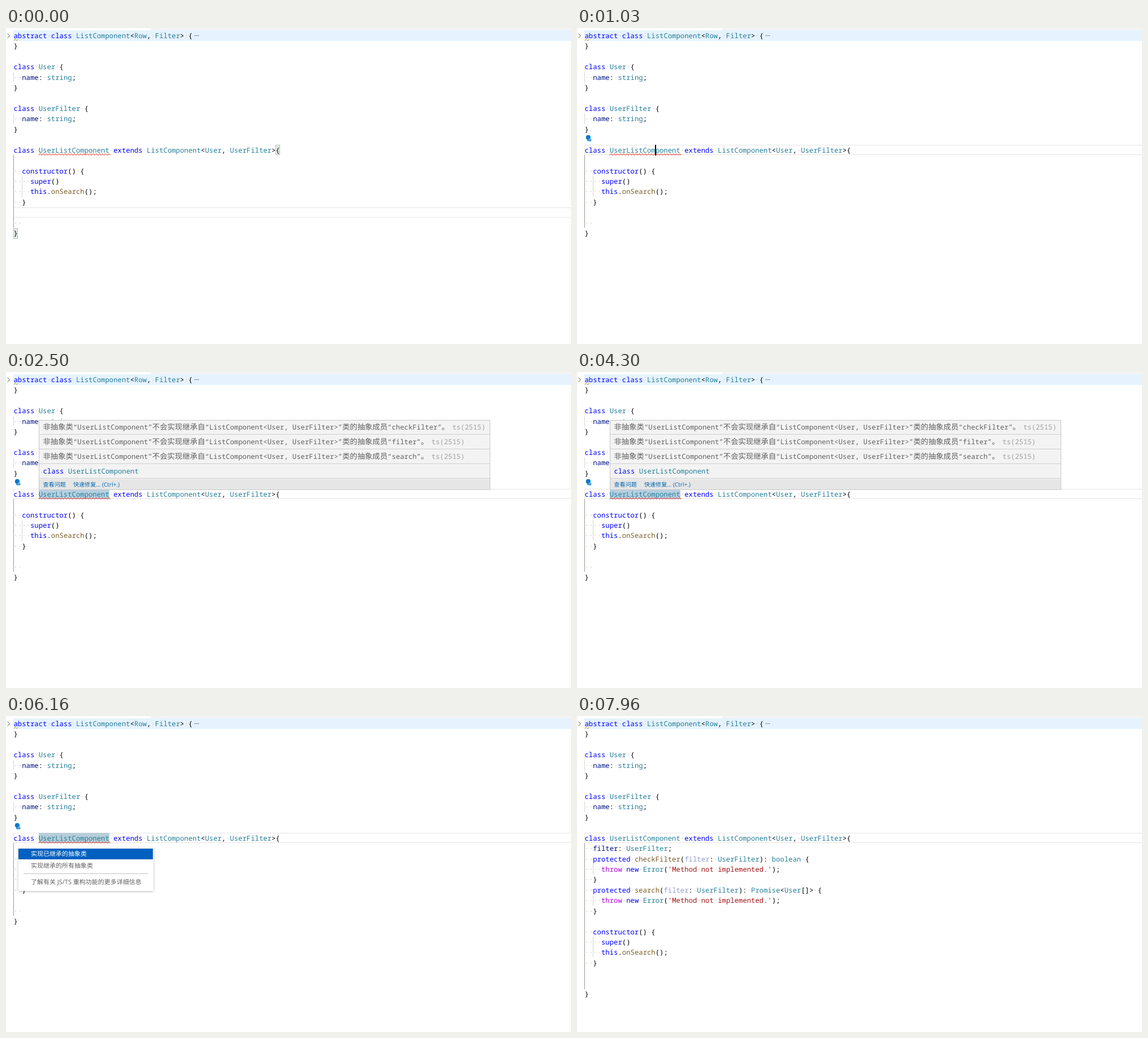
These frames come from a looping animation (1000 px wide and 560 px high, 8000 ms). An HTML page:

```html
<!DOCTYPE html>
<html lang="zh-CN">
<head>
<meta charset="utf-8">
<style>
html, body { margin: 0; width: 100%; height: 100%; overflow: hidden; background: #fff; }
#stage { position: relative; width: 1000px; height: 560px; overflow: hidden; text-rendering: geometricPrecision; }
#stage div, pre, svg { position: absolute; margin: 0; box-sizing: border-box; }
pre, #hover { font: 12.277px/18.44px "Noto Sans Mono", "Noto Sans CJK SC", monospace; white-space: pre; }
pre { left: 13.5px; color: #000; }
svg { left: 0; top: 0; }
.str { color: #a31515; } .flow { color: #af00db; } .key { color: #00f; } .type { color: #267f99; }
.fn { color: #795e26; } .param, .prop { color: #001080; } .dot { color: #c6c4b8; }
.faded .param { opacity: .42; }
.guide { width: 1px; background: #d6d6d6; }
.active { background: #989898; }
.current { left: 13px; width: 990px; height: 18px; border: 1px solid #e4e4e4; }
.match { width: 8px; height: 18px; border: 1px solid #b9b9b9; background: #e6efe6; }
#hover { left: 58px; top: 85px; width: 799px; height: 124px; border: 1px solid #c8c8c8; background: #f3f3f3; color: #616161; }
#hover div { left: 0; width: 797px; height: 26px; padding-left: 6.5px; line-height: 25px; border-bottom: 1px solid #cfcfcf; }
#hover i { font-style: normal; font-size: 13.36px; }
#hover s { text-decoration: none; color: #a0a0a0; margin-left: 5.5px; }
#hover .foot { top: 104px; height: 18px; border: 0; background: #e6e6e6; color: #006ab1; font-size: 10.1px; line-height: 18px; }
.foot, #menu { font-family: "Open Sans", "Noto Sans CJK SC", sans-serif; }
.foot span { margin-right: 13px; }
#menu { left: 22px; top: 234px; width: 239px; height: 76px; background: #fff; box-shadow: 0 1px 4px rgba(0,0,0,.28); color: #616161; font-size: 11px; }
#menu div { left: 0; width: 238px; height: 19px; padding-left: 22px; line-height: 19px; white-space: pre; }
#menu .pick { top: 1px; background: #0060c0; color: #fff; }
#menu .rule { left: 9px; top: 45px; width: 221px; height: 1px; background: #c4c4c4; }
</style>
</head>
<body>
<div id="stage"></div>
<script>
const stage = document.getElementById('stage');
const TOP = 4.1, LINE = 18.44, LEFT = 13.5, CELL = 7.366;
const rowY = n => TOP + n * LINE, colX = n => LEFT + n * CELL;

const head = `abstract class ListComponent<Row, Filter> {
}

class User {
  name: string;
}

class UserFilter {
  name: string;
}

class UserListComponent extends ListComponent<User, UserFilter>{`;
const ctor = `
  constructor() {
    super()
    this.onSearch();
  }

`;
const oldBody = ctor + '  \n}';
const newBody = `  filter: UserFilter;
  protected checkFilter(filter: UserFilter): boolean {
    throw new Error('Method not implemented.');
  }
  protected search(filter: UserFilter): Promise<User[]> {
    throw new Error('Method not implemented.');
  }
` + ctor + '\n}';

const TOKEN = new RegExp([
  "(?<str>'.*?')", '\\b(?<flow>throw)\\b',
  '\\b(?<key>abstract|class|extends|constructor|super|this|protected|new)\\b',
  '\\b(?<type>ListComponent|UserListComponent|UserFilter|User|Row|Filter|string|boolean|Promise|Error)\\b',
  '\\b(?<fn>onSearch|checkFilter|search)\\b', '(?<=\\()(?<param>filter)',
  '\\b(?<prop>name|filter)\\b', ' ', '<'
].join('|'), 'g');
const dots = s => s.replace(/ /g, '<span class="dot">·</span>');

function paint(code) {
  return code.replace(TOKEN, (m, ...rest) => {
    if (m === '<') return '&lt;';
    if (m === ' ') return dots(m);
    const groups = rest.pop();
    const kind = Object.keys(groups).find(k => groups[k]);
    return `<span class="${kind}">${dots(m)}</span>`;
  });
}

function add(html, parent = stage) {
  parent.insertAdjacentHTML('beforeend', html);
  return parent.lastElementChild;
}
const box = (x, y, w, h, css, parent) =>
  add(`<div style="left:${x}px;top:${y}px;width:${w}px;height:${h}px;${css}"></div>`, parent);
// The parser drops the first newline of a <pre>, so one is added.
const text = (code, row, parent) => add(`<pre style="top:${rowY(row) + .7}px">\n${paint(code)}</pre>`, parent);
const guide = (col, from, to, parent, kind = '') =>
  add(`<div class="guide ${kind}" style="left:${Math.floor(colX(col))}px;top:${rowY(from)}px;height:${(to - from) * LINE}px"></div>`, parent);
const wave = (x0, x1, y, color) => {
  let d = `M${x0} ${y + 2.3}`;
  for (let x = x0, up = true; x < x1 - 1; up = !up) d += `L${x += 2.76} ${y + (up ? 0 : 2.3)}`;
  return add(`<svg width="1000" height="560"><path d="${d}" fill="none" stroke="${color}" stroke-width="1"/></svg>`);
};

// Fixed parts
box(257, 0, 743, 4, 'background:#f3f3f3');
box(13, 4, 987, 18.5, 'background:#e6f3ff');
const lineLow = add(`<div class="current" style="top:318px"></div>`);
const lineTop = add(`<div class="current" style="top:207px"></div>`);
const word = box(colX(6), 207, 17 * CELL, 18, 'background:#b7ced9');
const tint = box(colX(6), 207, 17 * CELL, 18, 'background:rgba(173,214,255,.2)');
const matches = add('<div></div>');
add('<div class="match" style="left:477px;top:207px"></div>', matches);
add('<div class="match" style="left:13px;top:355px"></div>', matches);
text(head, 0);
guide(0, 4, 5);
guide(0, 8, 9);
add(`<svg width="400" height="30"><path d="M2.6 10l3.7 3.7-3.7 3.7" fill="none" stroke="#555"/>
  <path d="M333.5 13.5h2m1 0h2m1 0h2" stroke="#888" stroke-width="1.5"/></svg>`);
wave(13.5, 20.5, 20, '#bf9a3a');

const before = add('<div></div>');
text(oldBody, 12, before);
guide(0, 12, 19, before, 'active');
guide(2, 14, 16, before);

const after = add('<div></div>');
text(newBody, 12, after);
guide(0, 12, 26, after, 'active');
guide(2, 14, 15, after);
guide(2, 17, 18, after);
guide(2, 21, 23, after);

const squiggle = wave(colX(6), colX(23), 223, '#e51400');
const caret = box(138, 207, 2, 19, 'background:#000');
const bulb = add(`<svg width="40" height="210" fill="#007acc"><circle cx="19.9" cy="193.9" r="4.1"/>
  <path d="M18.4 196h2.8v4.6h-2.8z"/><circle cx="23.2" cy="198.8" r="2.5" stroke="#fff" stroke-width=".7"/>
  <circle cx="23.2" cy="198.8" r=".8" fill="#fff"/></svg>`);

// Hover card
const hover = add('<div id="hover"></div>');
const cjk = s => s.replace(/[\u3000-\u9fff]+/g, '<i>$&</i>');
['checkFilter', 'filter', 'search'].forEach((member, i) => add(
  `<div style="top:${i * 26 - 1}px">${cjk(`非抽象类“UserListComponent”不会实现继承自“ListComponent&lt;User, UserFilter>”类的抽象成员“${member}”。`)}<s>ts(2515)</s></div>`, hover));
add('<div style="top:77px"><span class="key">class</span> <span class="type">UserListComponent</span></div>', hover);
add('<div class="foot"><span>查看问题</span><span>快速修复... (Ctrl+.)</span></div>', hover);

// Quick fix menu
const menu = add(`<div id="menu"><div class="pick">实现已继承的抽象类</div>
  <div style="top:22px">实现继承的所有抽象类</div><div class="rule"></div>
  <div style="top:51px">了解有关 JS/TS 重构功能的更多详细信息</div></div>`);

const show = (el, on) => { el.style.visibility = on ? 'visible' : 'hidden'; };
const CLICK = 830, MENU = 6160, APPLY = 7430, CHECKED = 7830;

function hoverAlpha(t) {
  for (const [from, to] of [[500, CLICK], [2430, 5360]])
    if (t >= from && t < to) return Math.min(1, .35 + (t - from) / 100);
  return 0;
}

function caretOn(t) {
  if (t < CLICK) return false;
  if (t < MENU) return t < 1300 || (t - 1300) % 1000 >= 530;
  return t >= APPLY && t < 7955;
}

function draw(now) {
  const t = now % 8000, alpha = hoverAlpha(t), clicked = t >= CLICK, applied = t >= APPLY;
  hover.style.opacity = tint.style.opacity = alpha;
  show(lineLow, !clicked);
  show(matches, !clicked);
  show(lineTop, clicked);
  show(bulb, t >= 1000 && !applied);
  show(word, t >= 1090 && !applied);
  show(menu, t >= MENU && !applied);
  show(before, !applied);
  show(after, applied);
  show(squiggle, t < CHECKED);
  after.className = t >= CHECKED ? 'faded' : '';
  show(caret, caretOn(t));
}

let start;
function tick(now) {
  start ??= now;
  draw(now - start);
  requestAnimationFrame(tick);
}
draw(0);
requestAnimationFrame(tick);
</script>
</body>
</html>
```
